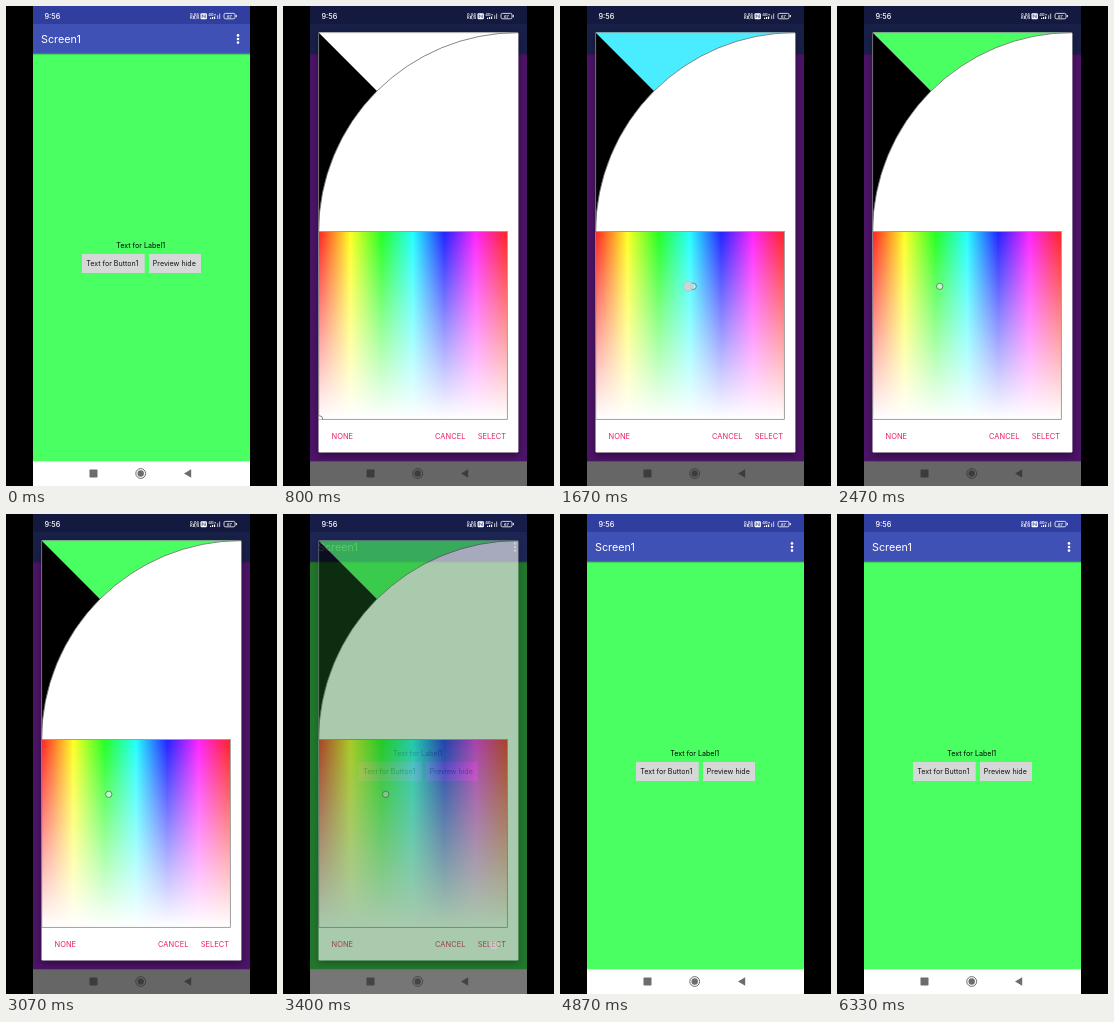
An HTML page that plays this animation: 271x480 px, repeating every 6470 ms.

```html
<!DOCTYPE html>
<html lang="en">
<head>
<meta charset="utf-8">
<title>Color picker</title>
<style>
  html, body { margin: 0; width: 100%; height: 100%; overflow: hidden; background: #000; }
  svg { display: block; width: 100vw; height: 100vh; }
  text { font-family: Inter, Roboto, sans-serif; font-size: 7.1px; }
  .bar { fill: #fff; }
  .tiny { font-size: 4px; font-weight: 600; }
  .action { fill: #e91e63; font-size: 7.5px; }
</style>
</head>
<body>
<svg viewBox="0 0 271 480">
  <defs>
    <linearGradient id="hues"></linearGradient>
    <linearGradient id="fade" x2="0" y2="1">
      <stop stop-color="#fff" stop-opacity=".14"/>
      <stop offset="1" stop-color="#fff"/>
    </linearGradient>
    <linearGradient id="shade" x2="0" y2="1">
      <stop stop-opacity=".25"/>
      <stop offset="1" stop-opacity="0"/>
    </linearGradient>
    <filter id="blur" x="-10%" y="-10%" width="120%" height="120%">
      <feGaussianBlur stdDeviation="3.5"/>
    </filter>
    <clipPath id="strip"><rect x="35.7" y="225.5" width="188.8" height="188"/></clipPath>
  </defs>
  <rect width="271" height="480"/>

  <!-- app screen -->
  <rect id="page" x="27" y="47" width="217" height="409"/>
  <rect x="27" width="217" height="18.5" fill="#303f9f"/>
  <rect x="27" y="18" width="217" height="29.7" fill="#3f51b5"/>
  <rect x="27" y="47.7" width="217" height="2" fill="url(#shade)"/>
  <text class="bar" x="35" y="37" style="font-size:10.8px">Screen1</text>
  <g fill="#fff">
    <circle cx="232" cy="29.4" r="1.3"/><circle cx="232" cy="33" r="1.3"/><circle cx="232" cy="36.6" r="1.3"/>
  </g>
  <text x="110.3" y="241.5">Text for Label1</text>
  <g fill="#d6d7d7">
    <rect x="76" y="248" width="62.7" height="19"/>
    <rect x="143" y="248" width="52" height="19"/>
  </g>
  <text x="80.2" y="260.3" fill="#111">Text for Button1</text>
  <text x="146.8" y="260.3" fill="#111">Preview hide</text>
  <rect x="27" y="455.3" width="217" height="24.7" fill="#fff"/>
  <g id="nav" fill="#6c6c6c">
    <rect x="83.5" y="463.5" width="8" height="8" rx=".8"/>
    <circle cx="134.7" cy="467.5" r="3.2"/>
    <circle cx="134.7" cy="467.5" r="4.9" fill="none" stroke="#6c6c6c"/>
    <path d="M178 467.5L185.2 463.2V471.8Z"/>
  </g>
  <rect id="dim" x="27" width="217" height="480"/>

  <!-- status icons stay bright above the dim -->
  <text class="bar" x="38.5" y="12.8" style="font-size:7.3px;font-weight:500">9:56</text>
  <g fill="#fff">
    <text class="tiny" x="184" y="9.6">0.04</text>
    <text class="tiny" x="184" y="13">KB/s</text>
    <rect x="194.5" y="7.2" width="6.4" height="6" rx="1"/>
    <path d="M196.2 12V8.6L199.2 11.8V8.4" fill="none" stroke="#303f9f" stroke-width=".8"/>
    <text class="tiny" x="202.2" y="10.2">4G+</text>
    <path d="M204 13V11.8H205.2V13ZM206 13V11H207.2V13ZM208 13V10.4H209.2V13Z"/>
    <path d="M211 13V9.2H212.2V13ZM213 13V7.6H214.2V13Z" opacity=".6"/>
    <rect x="218" y="7.4" width="11" height="5.4" rx="1.4" fill="none" stroke="#fff" stroke-width=".8"/>
    <rect x="229.8" y="9" width="1" height="2.2"/>
    <text class="tiny" x="221" y="11.7">67</text>
  </g>

  <!-- picker dialog -->
  <g id="dialog">
    <rect x="36" y="30" width="199" height="419" filter="url(#blur)" opacity=".45"/>
    <rect x="35.5" y="26.5" width="199.9" height="419.9" rx="1.2" fill="#fff"/>
    <path id="swatch" d="M35.6 26.6H235A199.4 199.4 0 0 0 94 85Z"/>
    <path d="M35.6 26.6L94 85A199.4 199.4 0 0 0 35.6 226Z"/>
    <path d="M35.6 226A199.4 199.4 0 0 1 235 26.6" fill="none" stroke="#666" stroke-width=".8"/>
    <path d="M35.7 226V26.7H235" fill="none" stroke="#888" stroke-width=".5"/>
    <rect x="36" y="226" width="188" height="187" fill="url(#hues)"/>
    <rect x="36" y="226" width="188" height="187" fill="url(#fade)"/>
    <rect x="35.8" y="225.6" width="188.5" height="187.7" fill="none" stroke="#777" stroke-width=".7"/>
    <g clip-path="url(#strip)">
      <circle id="ring" r="3.2" fill="#fff" fill-opacity=".55" stroke="#666" stroke-width=".8"/>
    </g>
    <text class="action" x="48.5" y="432.6">NONE</text>
    <text class="action" x="152" y="432.6">CANCEL</text>
    <text class="action" x="194.8" y="432.6">SELECT</text>
  </g>
  <circle id="touch" r="5" fill="#d4d4d4" stroke="#aaa" stroke-width=".5"/>
</svg>
<script>
const LOOP = 6470, OPEN = 650, CLOSE = 3340;
const BOX = { x: 36, y: 226, w: 188, h: 187 };
const PURPLE = '#bb33ff';
const $ = id => document.getElementById(id);
const clamp = v => Math.max(0, Math.min(1, v));
const ramp = (t, start, length) => clamp((t - start) / length);
const smooth = u => u * u * (3 - 2 * u);
const set = (el, attrs) => { for (const k in attrs) el.setAttribute(k, attrs[k]); };

$('hues').innerHTML = Array.from({ length: 7 }, (_, i) =>
  `<stop offset="${i / 6}" stop-color="hsl(${i * 60},100%,50%)"/>`).join('');

// Full-value HSV colour at a point of the strip
function pick({ x, y }) {
  const hue = (x - BOX.x) / BOX.w * 360;
  const sat = clamp((BOX.y + BOX.h - y) / BOX.h);
  return `hsl(${hue},100%,${100 - 50 * sat}%)`;
}

const drag = t => ({ x: 134 - 31.3 * smooth(ramp(t, 1560, 400)), y: 280.3 });
const taps = [
  { from: 400, to: 470, at: () => ({ x: 104, y: 263 }) },
  { from: 1270, to: 2130, at: drag },
  { from: 3200, to: 3360, at: () => ({ x: 211, y: 431 }) }
];
const CHOSEN = pick(drag(LOOP));

function draw(t) {
  const ring = t < 1270 ? { x: 36.5, y: 413 } : drag(t - 70);
  const alpha = ramp(t, OPEN, 140) * (1 - ramp(t, CLOSE, 155));
  const dim = 0.6 * smooth(ramp(t, OPEN, 145)) * (1 - smooth(ramp(t, CLOSE, 300)));
  set($('page'), { fill: t >= 70 && t < CLOSE ? PURPLE : CHOSEN });
  set($('dim'), { opacity: dim });
  set($('nav'), { opacity: 1 - dim / 2 });
  set($('dialog'), { opacity: alpha, visibility: alpha > 0 ? 'visible' : 'hidden' });
  set($('swatch'), { fill: pick(ring) });
  set($('ring'), { cx: ring.x, cy: ring.y });

  const tap = taps.find(p => t >= p.from && t < p.to + 100);
  if (tap) {
    const p = tap.at(t);
    set($('touch'), { cx: p.x, cy: p.y, opacity: 0.85 * (1 - ramp(t, tap.to, 100)) });
  } else {
    set($('touch'), { opacity: 0 });
  }
}

let start;
function tick(now) {
  start ??= now;
  draw((now - start) % LOOP);
  requestAnimationFrame(tick);
}
draw(0);
requestAnimationFrame(tick);
</script>
</body>
</html>
```
